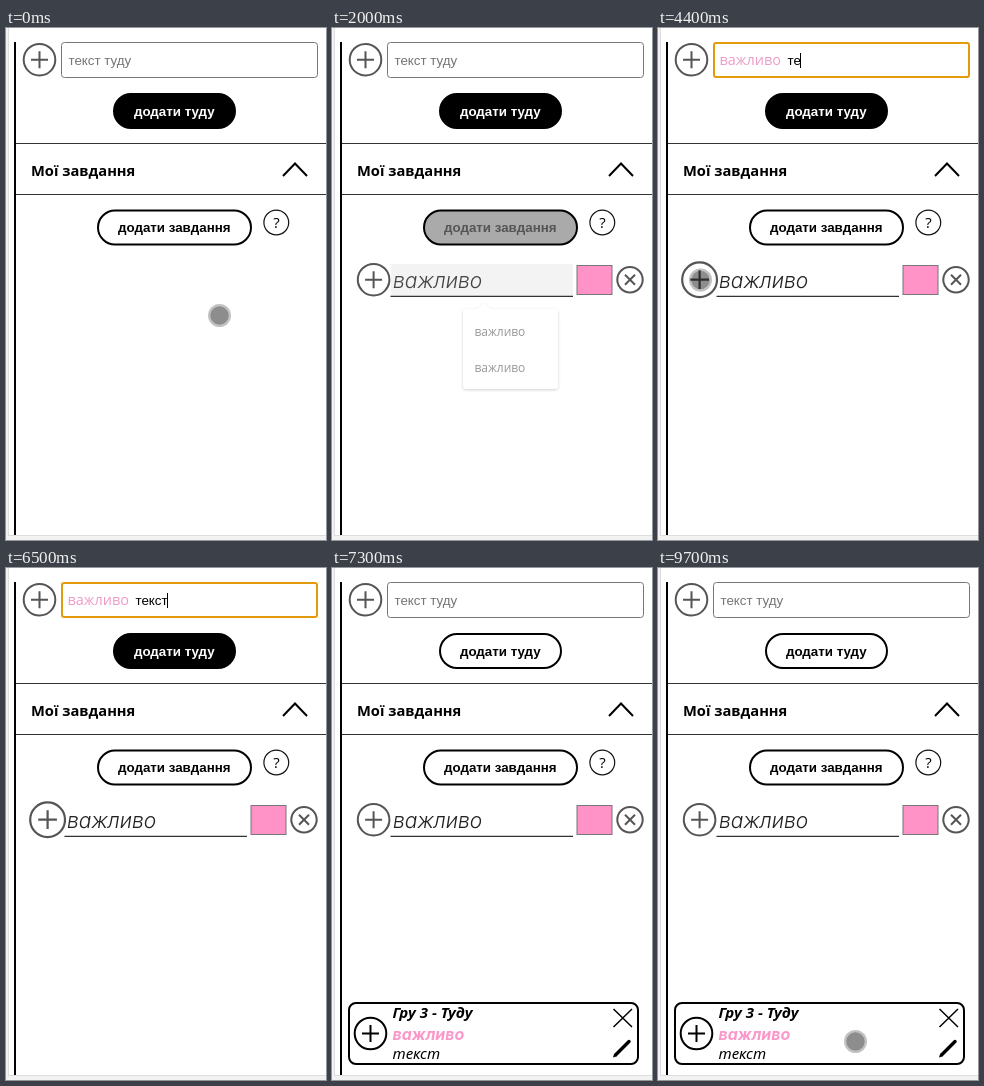
An HTML page that plays this animation: 320 by 512 pixels, repeating every 10 s.

```html
<!DOCTYPE html>
<html lang="uk">
<head>
<meta charset="utf-8">
<style>
  html, body { margin: 0; width: 100%; height: 100%; overflow: hidden; background: #fff; }
  svg { display: block; width: 320px; height: 512px; }
  text { white-space: pre; }
  .ui { font: 13.333px "Liberation Sans", Arial, sans-serif; }
  .button { font-weight: bold; text-anchor: middle; }
  .sans { font-family: "Open Sans", "Noto Sans", sans-serif; }
  .wide { font-family: Inter, "Open Sans", sans-serif; font-style: italic; }
  .line { fill: none; stroke: #555; stroke-width: 2; }
  .black { stroke: #000; }
</style>
</head>
<body>
<svg viewBox="0 0 320 512">
  <defs>
    <g id="plus"><circle r="15.8"/><path d="M-8.5 0H8.5M0-8.5V8.5"/></g>
    <filter id="shadow" x="-20%" y="-20%" width="140%" height="140%">
      <feDropShadow dx="0" dy="1" stdDeviation="1.5" flood-opacity=".28"/>
    </filter>
  </defs>

  <!-- page frame -->
  <rect width="320" height="512" fill="#f2f2f2"/>
  <rect x="2.5" y="-1" width="320" height="508.5" fill="#fff" stroke="#ddd"/>
  <path d="M9 14V507" class="line black"/>
  <path d="M10 115.5H320M10 166.5H320" stroke="#333"/>

  <!-- new todo -->
  <use href="#plus" class="line" x="33.5" y="31.7"/>
  <rect id="field" fill="#fff"/>
  <text id="hint" class="ui" x="62.5" y="37" fill="#757575">текст туду</text>
  <g id="entry">
    <text class="sans" x="61.5" y="37" font-size="14.5" font-weight="500" fill="#ec9cc8">важливо</text>
    <text id="typed" class="ui" x="129.5" y="37"></text>
    <rect id="caret" y="25" width="1" height="15"/>
  </g>
  <g id="addTodo">
    <rect x="108" y="66" width="121" height="34" rx="17" stroke="#000" stroke-width="2"/>
    <text class="ui button" x="168.3" y="88">додати туду</text>
  </g>

  <!-- task list -->
  <text x="25" y="148" font-family="Noto Sans, Open Sans, sans-serif" font-size="14.7" font-weight="700">Мої завдання</text>
  <path d="M277 148L289 135.5L301 148" class="line black" stroke-width="2.5"/>
  <g id="addTask">
    <rect x="92" y="182.5" width="153" height="34" rx="17" stroke="#000" stroke-width="2"/>
    <text class="ui button" x="168.3" y="204">додати завдання</text>
  </g>
  <circle cx="270.3" cy="194.5" r="12.4" fill="none" stroke="#111" stroke-width="1.2"/>
  <text class="sans" x="270.5" y="199.5" font-size="15" text-anchor="middle">?</text>

  <g id="row">
    <g id="rowInput">
      <rect id="rowFill" x="38" y="236" width="182" height="32" fill="#f3f3f3"/>
      <text id="rowText" class="wide" x="40" y="259.5" font-size="21" font-weight="300">важливо</text>
      <path d="M37.5 268.3H220" stroke="#333" stroke-width="1.2"/>
    </g>
    <rect id="swatch" y="237.5" height="29" fill="#ff92c6" stroke="#777"/>
    <g id="rowIcons" class="line">
      <g id="rowPlus"><use href="#plus"/></g>
      <circle cx="298" cy="251.7" r="12.7"/>
      <path d="M293 246.7l10 10m0-10l-10 10"/>
    </g>
  </g>

  <g id="popup" class="sans" font-size="12" fill="#666">
    <path filter="url(#shadow)" fill="#fff" d="M134 281H145L152 275L159 281H223a3 3 0 0 1 3 3V358a3 3 0 0 1-3 3H134a3 3 0 0 1-3-3V284a3 3 0 0 1 3-3Z"/>
    <text x="142.5" y="308">важливо</text>
    <text x="142.5" y="343.5">важливо</text>
  </g>

  <!-- finished todo -->
  <g id="card">
    <rect x="17" y="435" width="289" height="61" rx="7" fill="#fff" stroke="#000" stroke-width="2"/>
    <use href="#plus" class="line black" x="38.5" y="465.5"/>
    <g font-family="Noto Sans, Open Sans, sans-serif" font-style="italic" font-size="15">
      <text x="60.5" y="450" font-weight="700">Гру 3 - Туду</text>
      <text x="60.5" y="491">текст</text>
    </g>
    <text class="wide" x="60.5" y="471.5" font-size="16" font-weight="700" fill="#fb98ca">важливо</text>
    <path d="M281.5 441l18.5 18m0-18l-18.5 18" stroke="#000" stroke-width="1.5"/>
    <path d="M284 486.5L297 473.5" stroke="#000" stroke-width="3.4" stroke-linecap="round"/>
    <path d="M281 489.5l1.2-4 2.8 2.8z"/>
  </g>

  <g id="touch">
    <circle r="11.5" fill="#000" fill-opacity=".24"/>
    <circle r="9.2" fill="#000" fill-opacity=".27"/>
  </g>
</svg>
<script>
const LOOP = 10000, STEP = 100;
const el = id => document.getElementById(id);
const set = (id, attrs) => {
  for (const name in attrs) el(id).setAttribute(name, attrs[name]);
};
const show = (id, visible) => set(id, { display: visible ? 'inline' : 'none' });
const ramp = (t, from, to) => Math.min(1, Math.max(0, (t - from) / (to - from)));
const easeOut = p => 1 - (1 - p) ** 3;
const within = (t, from, to) => t >= from && t < to;

const keyTimes = [4100, 4400, 4700, 5200, 5400];

// Each stretch of touch: visible from, until, then [time, x, y] points.
const touches = [
  [0, 100, [0, 213.5, 287.5]],
  [1700, 1900, [1700, 161.5, 254.5]],
  [2500, 6000, [2500, 42.5, 252]],
  [7700, LOOP, [7700, 180.5, 458.5], [8100, 200.5, 485.5], [8300, 198, 481.5],
    [9400, 198, 481.5], [9700, 197.5, 473.5]]
];

function touchAt(t) {
  const touch = touches.find(([from, until]) => within(t, from, until));
  if (!touch) return null;
  const points = touch.slice(2);
  const next = points.findIndex(p => p[0] > t);
  if (next < 0) return points.at(-1).slice(1);
  const a = points[next - 1], b = points[next], p = ramp(t, a[0], b[0]);
  return [a[1] + (b[1] - a[1]) * p, a[2] + (b[2] - a[2]) * p];
}

function paintButton(id, darkness) {
  const light = Math.round(255 * (1 - darkness)), dark = 255 - light;
  const [box, label] = el(id).children;
  box.setAttribute('fill', `rgb(${light},${light},${light})`);
  label.setAttribute('fill', `rgb(${dark},${dark},${dark})`);
}

function draw(t) {
  const editing = within(t, 3100, 6700);
  set('field', editing
    ? { x: 56, y: 15, width: 255, height: 34, rx: 2, stroke: '#e39a0c', 'stroke-width': 2 }
    : { x: 55.5, y: 14.5, width: 256, height: 35, rx: 3, stroke: '#767676', 'stroke-width': 1 });
  show('hint', !editing);
  show('entry', editing);
  el('typed').textContent = 'текст'.slice(0, keyTimes.filter(k => k <= t).length);
  const typedWidth = editing ? el('typed').getComputedTextLength() : 0;
  set('caret', { x: Math.floor(129 + typedWidth) });
  show('caret', !within(t, 3500, 4000) && !within(t, 5900, 6400));

  paintButton('addTodo', 1 - ramp(t, 6600, 6900));
  paintButton('addTask', ramp(t, 850, 1200) - ramp(t, 1800, 2100));

  const saved = t >= 1900;
  show('row', t >= 900);
  show('rowIcons', saved);
  show('rowFill', within(t, 1900, 3100));
  set('rowInput', { transform: `translate(${saved ? 21 : 0})` });
  set('rowText', { fill: t < 2500 ? '#444' : '#222' });
  set('swatch', saved ? { x: 245, width: 35 } : { x: 224.5, width: 70 });
  const zoom = 1 + 0.1 * (ramp(t, 3000, 3200) - ramp(t, 6600, 6900));
  set('rowPlus', { transform: `translate(41.6 251.7) scale(${zoom})` });

  set('popup', { opacity: ramp(t, 1800, 2100) - 0.25 * ramp(t, 2900, 3000) });
  show('popup', within(t, 1900, 3100));

  show('card', t >= 6700);
  set('card', { transform: `translate(0 ${78 * (1 - easeOut(ramp(t, 6650, 7300)))})` });

  const touch = touchAt(t);
  show('touch', touch);
  if (touch) set('touch', { transform: `translate(${touch})` });
}

const start = performance.now();
function tick() {
  const t = (performance.now() - start) % LOOP;
  draw(Math.floor(t / STEP) * STEP);
  requestAnimationFrame(tick);
}
tick();
</script>
</body>
</html>
```
